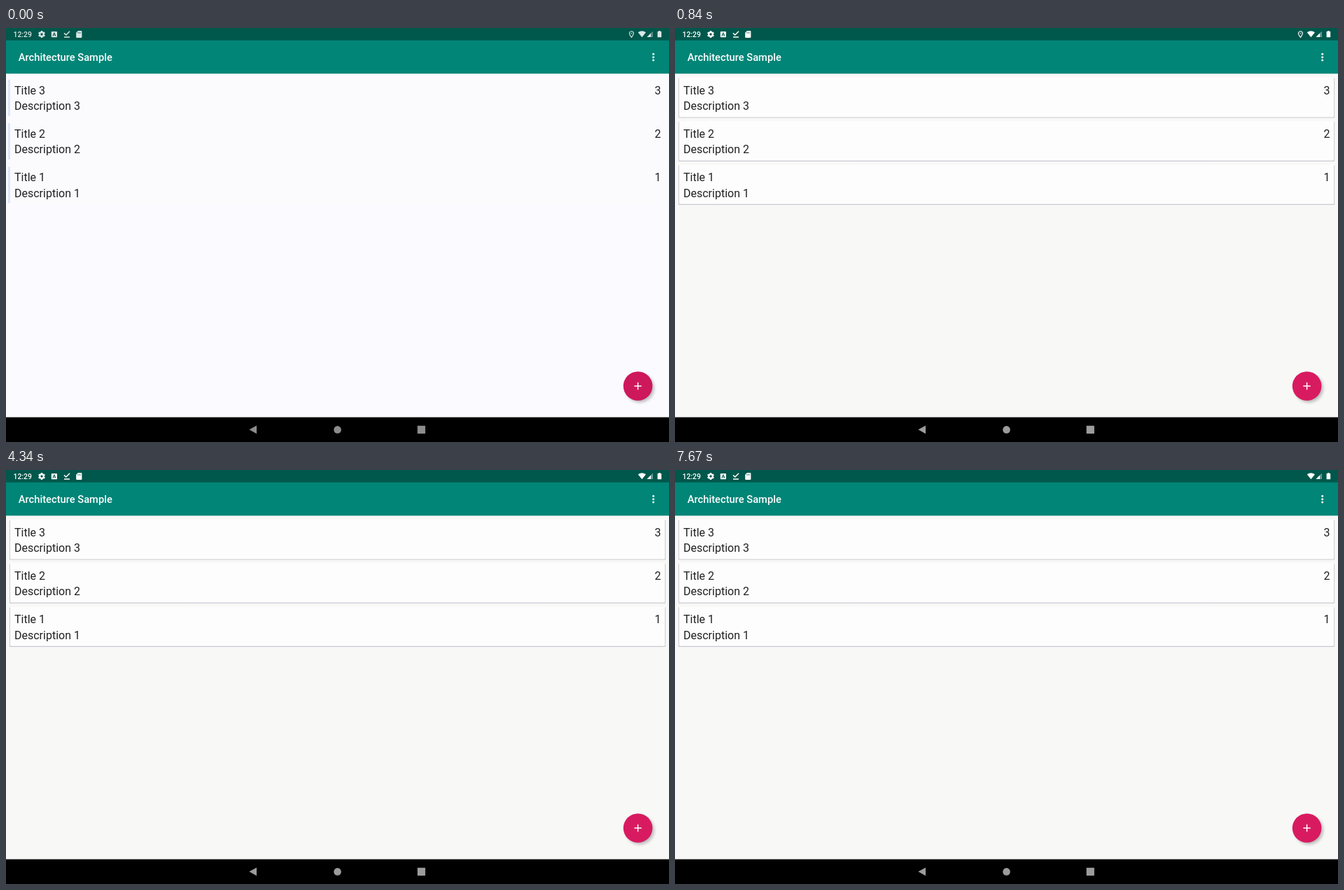
Recreate the animation shown at these times as an HTML page. Size 947x592 px, loop 8 s.

```html
<!DOCTYPE html>
<html lang="en">
<head>
<meta charset="utf-8">
<title>Task list</title>
<style>
  html, body { margin: 0; width: 100%; height: 100%; overflow: hidden; background: #000; }
  svg { display: block; width: 100vw; height: 100vh; font-family: Roboto, sans-serif; }
  .face { fill: #fdfdfd; }
  .shade { fill: #c9c9d3; filter: blur(.5px); }
  .card text { fill: #212121; font-size: 16px; }
  .end { text-anchor: end; }
  .medium { font-weight: 500; fill: #fff; }
</style>
</head>
<body>
<svg viewBox="0 0 947 592" preserveAspectRatio="none">
  <defs>
    <clipPath id="page"><rect y="65" width="947" height="492"/></clipPath>
  </defs>
  <rect id="bg" width="947" height="592"/>
  <g id="list" clip-path="url(#page)"></g>

  <rect width="947" height="18" fill="#00574b"/>
  <rect y="17.7" width="947" height="47.6" fill="#008577"/>
  <text class="medium" x="17.8" y="47.4" font-size="14.7">Architecture Sample</text>
  <g fill="#fff">
    <circle cx="924.7" cy="37.3" r="1.5"/>
    <circle cx="924.7" cy="41.7" r="1.5"/>
    <circle cx="924.7" cy="46.1" r="1.5"/>
  </g>

  <g id="status" fill="#fff">
    <text class="medium" x="10.6" y="12.6" font-size="10.36">12:29</text>
    <circle cx="51" cy="9" r="2.8" fill="none" stroke="#fff" stroke-width="2.2"/>
    <g id="teeth" stroke="#fff" stroke-width="2.4"></g>
    <rect x="64.8" y="5" width="8.2" height="8.2" rx=".8"/>
    <path d="M66.8 11.6 68.9 6.6 71 11.6M67.6 10H70.2" fill="none" stroke="#00574b"/>
    <path d="M83 7.4 85.8 10 91 4.8M83 13H91" fill="none" stroke="#fff" stroke-width="1.5"/>
    <path d="M102.9 4H107.4Q108.4 4 108.4 5V13Q108.4 14 107.4 14H101.2Q100.2 14 100.2 13V6.7Z"/>
    <path d="M102.7 5.8V7.8M104.5 5.8V7.8M106.3 5.8V7.8" stroke="#00574b" stroke-width=".7"/>
    <path id="pin" d="M893.4 13.4C891.6 11 890.4 9.4 890.4 7.7A3 3 0 0 1 896.4 7.7C896.4 9.4 895.2 11 893.4 13.4ZM892.4 7.7H894.4" fill="none" stroke="#fff" stroke-width="1.1"/>
    <path d="M902.8 6.2Q908.4 2.2 914 6.2L908.4 13.2Z"/>
    <path d="M915.6 13V12.6L924 4.4V13Z" opacity=".4"/>
    <path d="M915.6 13 921 7.5V13Z"/>
    <path d="M932.2 4H934.6V5H936.2V13.2H930.6V5H932.2Z"/>
  </g>

  <circle cx="905.4" cy="515" r="20.4" fill="#000" opacity=".25" style="filter:blur(2px)"/>
  <circle id="fab" cx="902.6" cy="512" r="20.8"/>
  <path d="M897.4 512H907.8M902.6 506.8V517.2" stroke="#fff" stroke-width="1.5"/>

  <rect y="556.6" width="947" height="35.4" fill="#000"/>
  <g id="nav" fill="#9c9c9c">
    <path d="M347.4 574.3 358 568.4V580.2Z"/>
    <circle cx="473.5" cy="574.4" r="5.3"/>
    <rect x="587.7" y="568.8" width="11.2" height="11.2" rx=".5"/>
  </g>
</svg>
<script>
  const LOOP = 8000, ROW = 62.2, SETTLE = 300, PIN_OFF = 1650;
  const DRAG = { start: 6250, peak: 6800, hold: 6900, end: 7400, depth: 189 };
  const $ = id => document.getElementById(id);
  const clamp = v => Math.max(0, Math.min(1, v));
  const smooth = v => (v = clamp(v), v * v * (3 - 2 * v));
  const span = (t, a, b) => (t - a) / (b - a);
  const mix = (a, b, p) => `rgb(${a.map((v, i) => Math.round(v + (b[i] - v) * p))})`;

  $('list').innerHTML = [3, 2, 1].map((n, i) => {
    const y = 70.8 + i * ROW;
    return `<rect class="tint" x="3" y="${y + 3}" width="3" height="52" fill="#dce6fb"/>
      <g class="card" id="card${n}">
        <rect class="shade" x="4.9" y="${y + 1}" width="937.3" height="56.8" rx="1"/>
        <rect class="face" x="5.9" y="${y}" width="935.3" height="56.6" rx="1"/>
        <text x="12" y="${y + 24.1}">Title ${n}</text>
        <text x="12" y="${y + 46.3}">Description ${n}</text>
        <text class="end" x="935.4" y="${y + 24.1}">${n}</text>
      </g>`;
  }).join('');

  $('teeth').innerHTML = [0, 60, 120].map(a =>
    `<path d="M51 4V5.8M51 12.2V14" transform="rotate(${a} 51 9)"/>`).join('');

  const shades = document.querySelectorAll('.shade');
  const faces = document.querySelectorAll('.face');
  const tints = document.querySelectorAll('.tint');

  function dragX(t) {
    const out = smooth(span(t, DRAG.start, DRAG.peak));
    const back = smooth(span(t, DRAG.hold, DRAG.end));
    return -DRAG.depth * (out - back);
  }

  function draw(t) {
    const p = smooth(t / SETTLE);
    $('bg').setAttribute('fill', mix([251, 250, 254], [248, 248, 247], p));
    $('fab').setAttribute('fill', mix([206, 24, 92], [216, 27, 96], p));
    faces.forEach(f => f.style.fill = mix([251, 251, 254], [253, 253, 253], p));
    shades.forEach(s => s.style.opacity = p);
    tints.forEach(s => s.style.opacity = 1 - p);
    $('status').style.opacity = 0.85 + 0.15 * p;
    $('nav').style.opacity = 0.9 + 0.1 * p;
    $('pin').style.visibility = t < PIN_OFF ? 'visible' : 'hidden';
    $('card1').setAttribute('transform', `translate(${dragX(t).toFixed(2)} 0)`);
  }

  const begin = performance.now();
  function tick() {
    draw((performance.now() - begin) % LOOP);
    requestAnimationFrame(tick);
  }
  tick();
</script>
</body>
</html>
```
